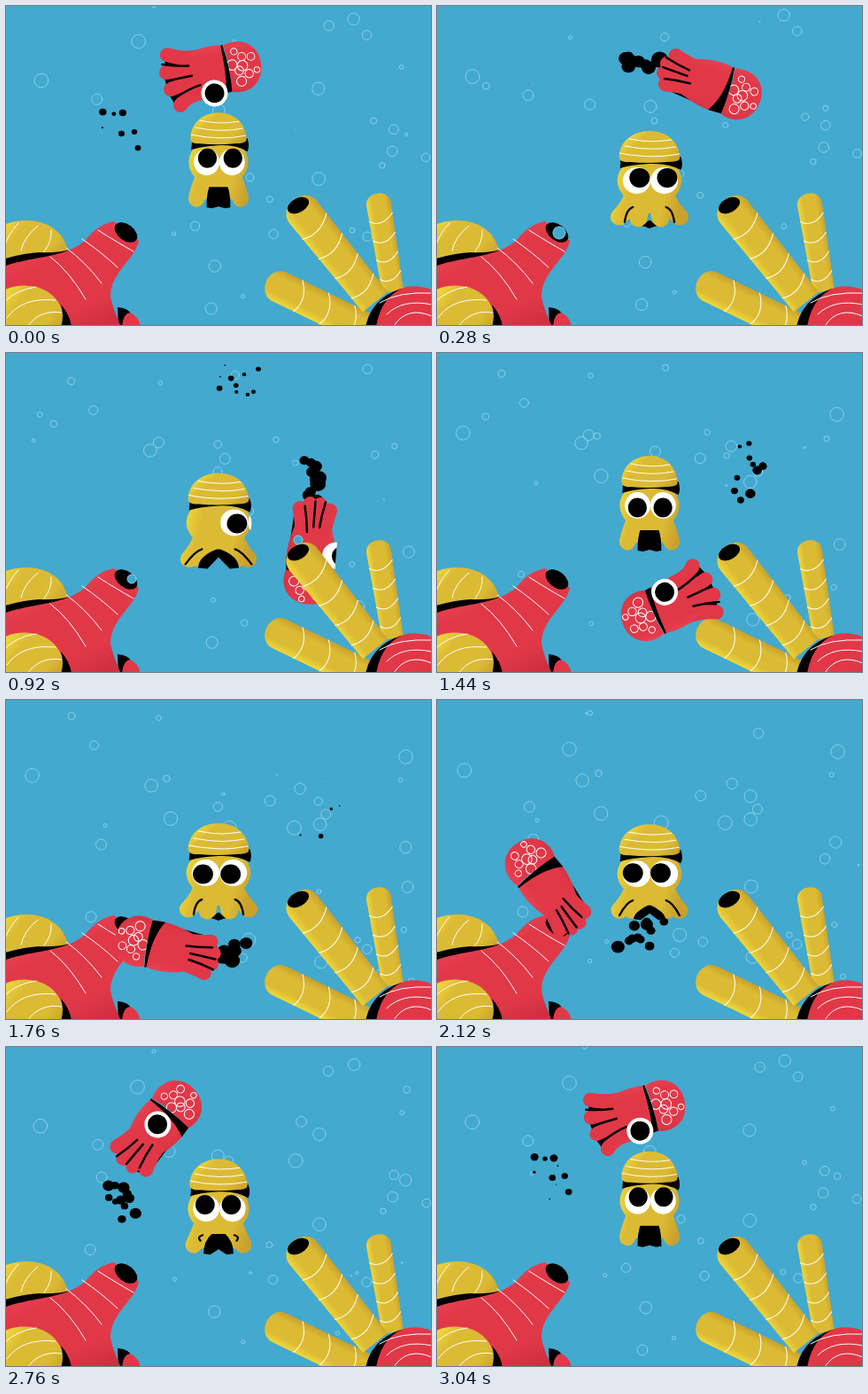
These frames come from a looping animation (480 px wide and 360 px high, 3.08 s). An HTML page with a canvas:

```html
<!DOCTYPE html>
<html>
<head>
<meta charset="utf-8">
<style>
html, body { margin: 0; width: 100%; height: 100%; overflow: hidden; background: #43a9cf }
canvas { display: block }
</style>
</head>
<body>
<canvas id="stage" width="480" height="360"></canvas>
<script>
const ctx = document.getElementById('stage').getContext('2d');
const LOOP = 3080, HALF = LOOP / 2, STEP = 40, RAD = Math.PI / 180;
const SEA = '#43a9cf', INK = '#000', WHITE = '#fff', RIM = '#8bd0ec', RED = '#e13848', YELLOW = '#dcbb34';

const clamp = v => Math.min(1, Math.max(0, v));
const smooth = v => { v = clamp(v); return v * v * (3 - 2 * v); };
const mix = (a, b, k) => a + (b - a) * k;
// Rises from a to b, holds, falls from c to d
const pulse = (t, a, b, c, d) => smooth((t - a) / (b - a)) * (1 - smooth((t - c) / (d - c)));
const noise = n => { const s = Math.sin(n * 127.1 + 3) * 43758.5; return s - Math.floor(s); };

function shade(x0, y0, x1, y1, light, base, dark) {
  const g = ctx.createLinearGradient(x0, y0, x1, y1);
  g.addColorStop(0, light);
  g.addColorStop(.25, base);
  g.addColorStop(.75, base);
  g.addColorStop(1, dark);
  return g;
}
const yellow = (...box) => shade(...box, '#f0d83a', YELLOW, '#c9a12d');
const red = (...box) => shade(...box, '#ea4555', RED, '#cf2f41');

function fill(d, color) {
  ctx.fillStyle = color;
  ctx.fill(new Path2D(d));
}
function line(d, color = WHITE, width = 1) {
  ctx.strokeStyle = color;
  ctx.lineWidth = width;
  ctx.lineCap = ctx.lineJoin = 'round';
  ctx.stroke(new Path2D(d));
}
function oval(x, y, rx, ry, color, turn = 0) {
  ctx.beginPath();
  ctx.ellipse(x, y, rx, ry, turn, 0, 7);
  ctx.fillStyle = color;
  ctx.fill();
}
function ring(x, y, r, color) {
  ctx.beginPath();
  ctx.arc(x, y, r, 0, 7);
  ctx.strokeStyle = color;
  ctx.lineWidth = 1;
  ctx.stroke();
}

// Each bubble swells, drifts up and shrinks around its own moment of the loop
function bubble(x, y, r, dt, life) {
  const size = r * clamp((life - Math.abs(dt)) / 140);
  if (size) ring(x + Math.sin(dt / 260 + x), y - dt * .016, size, RIM);
}
const since = (t, at) => ((t - at + LOOP * 1.5) % LOOP) - HALF;

function bubbles(t) {
  for (let i = 0; i < 70; i++)
    bubble(480 * noise(i), 360 * noise(i + 100), 2 + 6 * noise(i + 200), since(t, LOOP * noise(i + 300)), 800);
}
function tubeBubble(t, at, x, y, r) {
  const dt = since(t, at), size = r * clamp((260 - Math.abs(dt)) / 120);
  oval(x, y - dt * .02, size, size, SEA);
  if (size) ring(x, y - dt * .02, size, RIM);
}

function leftReef() {
  fill('M-5 248C15 239 40 240 55 252Q66 260 70 276L40 284-5 300Z', yellow(0, 242, 60, 290));
  line('M17 276Q20 261 36 248M43 277Q52 266 51 253M-2 272Q2 258 14 245');
  fill('M-5 286Q20 279 38 278 56 279 72 275L66 292-5 302Z', INK);
  fill('M126 340Q140 341 142 350L136 362H127Z', INK);
  fill('M131 362Q132 347 140 346 150 350 152 362Z', RED);
  fill('M-5 295C30 281 65 286 90 264Q104 246 122 243L150 265C146 286 118 300 118 328Q120 340 130 362H-5Z',
    red(40, 260, 90, 370));
  for (let i = 0; i < 4; i++)
    line(`M${50 + i * 18} ${283 - i * 10}Q${72 + i * 18} ${300 - i * 11} ${90 + i * 18} ${331 - i * 18}`);
  oval(135.5, 255.5, 14.5, 9, INK, .65);
  fill('M-5 322Q10 314 28 316 56 320 64 345V362H-5Z', yellow(5, 315, 65, 360));
  line('M1 352Q18 328 56 332M24 362Q38 342 63 346M-2 334Q12 320 34 317');
  fill('M62 337Q72 348 74 362H62Q66 350 62 337Z', INK);
}

// Tapered tube with evenly spaced stripes, from its tip to its foot
function tube(x0, y0, r0, x1, y1, r1, stripes) {
  const len = Math.hypot(x1 - x0, y1 - y0);
  ctx.save();
  ctx.translate(x0, y0);
  ctx.rotate(Math.atan2(y1 - y0, x1 - x0));
  fill(`M0 ${-r0}L${len} ${-r1}V${r1}L0 ${r0}C${-r0 * 1.2} ${r0} ${-r0 * 1.2} ${-r0} 0 ${-r0}Z`, yellow(0, r0, 0, -r0));
  for (let i = 0; i < stripes; i++) {
    const x = len * (i + .8) / (stripes + .5), r = mix(r0, r1, x / len);
    line(`M${x - 6} ${-r}Q${x + 9} 0 ${x} ${r}`);
  }
  ctx.restore();
}
function rightReef() {
  tube(421, 224, 14, 437, 322, 12, 4);
  tube(309, 317, 18, 412, 367, 18, 3);
  tube(336, 233, 20, 417, 334, 18, 4);
  oval(330, 225, 13, 8, INK, -.5);
  fill('M406 362Q410 342 425 330 438 320 452 318L430 362Z', INK);
  fill('M418 362Q424 326 452 317 468 314 485 322V362Z', red(425, 310, 470, 380));
  for (let i = 0; i < 3; i++)
    line(`M${438 - i * 8} ${361 - i * 13}Q${453 - i * 5} ${338 - i * 8} 481 ${350 - i * 13}`);
}

// The swimmer circles once per loop; its gait repeats every half turn
function orbit(t) {
  const k = t % HALF / HALF, turns = Math.floor(t / HALF) * 180;
  const sway = Math.sin(Math.PI * k ** .7);
  const angle = (180 * k - 76 + 8 * sway + turns) * RAD, dist = 116 + 20 * sway;
  return {
    k, angle,
    heading: (180 * k - 9 - 5 * sway + turns) * RAD,
    x: 238 + dist * Math.cos(angle),
    y: 180 + dist * Math.sin(angle)
  };
}
function swimmer({ k, x, y, heading }) {
  const fan = smooth((Math.abs(k - .45) - .28) / .17);
  const roll = k < .1 ? k + 1 : k, eyeY = 132 * (roll - .6) - 27, eyeR = 15 * clamp((1.1 - roll) / .07);
  const tips = [-1.5, -.5, .5, 1.5].map(s => [-92 + 3 * s * s + fan * (7 + 2 * s), s * (11.5 + 8 * fan) + 4 * fan]);
  const skin = red(0, -34, 0, 36);

  ctx.save();
  ctx.translate(x, y);
  ctx.rotate(heading);
  fill('M-50 -22L' + tips.map(([tx, ty]) => `${tx - 3} ${ty + 5}`).join('L') + 'L-50 25Z', INK);
  for (const [tx, ty] of tips) line(`M-48 ${ty * .7}Q-66 ${ty * .7} ${tx} ${ty}`, RED, 16);
  fill('M-17 -26C-32 -29 -48 -27 -66 -20Q-72 0 -66 21C-50 26 -34 30 -17 27Z', skin);
  tips.slice(1).forEach(([tx, ty], i) => {
    const my = (ty + tips[i][1]) / 2;
    line(`M${tx + 26} ${my * .6}Q${tx + 12} ${my * .7} ${tx - 3} ${my}`, INK, 2.5);
  });
  fill('M-17 -26C4 -34 24 -20 22 2C21 22 4 34 -16 27Q-12 0 -17 -26Z', skin);
  for (let i = 0; i < 9; i++) {
    const a = i * 2.4, d = 7.3 * Math.sqrt(i);
    ring(1 + d * Math.cos(a) * .8, d * Math.sin(a), 3 + 3 * noise(i + 5), WHITE);
  }
  fill(`M-18 -27Q-13 0 -15 27L${mix(-30, -22, fan)} 28Q-18 8 -20 -26Z`, INK);
  ctx.beginPath();
  ctx.rect(-70, -28, 70, 80);
  ctx.clip();
  oval(-35, eyeY, eyeR, eyeR, WHITE);
  oval(-35, eyeY + Math.min(0, eyeY) * .25, eyeR * .73, eyeR * .73, INK);
  ctx.restore();
}

// Two bursts per half turn: each blob leaves the tail, then drifts and fades
function ink(t) {
  for (let i = 0; i < 44; i++) {
    const burst = Math.floor(i / 11);
    const born = (burst >> 1) * HALF + (burst % 2 ? 715 : 70) + i % 11 * 20;
    const age = (t - born + LOOP) % LOOP, span = 650 + 400 * noise(i + 40);
    if (age > span) continue;
    const s = age / 1000, spread = 14 + 40 * s, { x, y, heading } = orbit(born);
    const dx = Math.cos(heading), dy = Math.sin(heading);
    const r = (6 + 4 * noise(i + 60)) * clamp(age / 60 + .4) * (1 - age / span) ** .6;
    oval(
      x + dx * (40 * s - 92) + (noise(i + 80) - .5) * spread,
      y + dy * (40 * s - 92) - 62 * s + (noise(i + 90) - .5) * spread,
      r, r * .92, INK);
  }
}

function hero(t, look) {
  const k = t % HALF / HALF, beat = (k + .065) % 1;
  const top = 116 + 25 * smooth(beat / .25) * (1 - Math.max(0, (beat - .25) / .75) ** 2.5);
  const open = pulse(beat, .065, .2, .74, .94), split = smooth((k - .2) / .3);
  const turn = 31 * pulse(t, 300, 800, 1000, 1350);
  const pose = (shut, loose, wide) => mix(shut, mix(loose, wide, split), open);
  const tipX = pose(26, 33, 32), innerX = pose(20, 12, 23), innerY = pose(90, 99, 96);
  const gap = pose(14, 9, 22), gapTop = pose(11, 1, 2), gapY = pose(84, 101, 86), gapMid = pose(106, 110, 95);

  ctx.save();
  ctx.translate(240, top);
  ctx.scale(mix(.96, 1.04, open), 1);
  const skin = yellow(-38, 50, 38, 70);
  for (const s of [-1, 1]) {
    line(`M${s * 19} 76Q${s * 24} 88 ${s * tipX} 97`, skin, 19);
    line(`M${s * 8} 76L${s * innerX} ${innerY}`, skin, 19);
  }
  oval(0, 76, 28, 17, skin);
  oval(0, 56, 35, 28, skin);
  if (open > .1)
    for (const s of [-1, 1])
      line(`M${s * 18} 86Q${s * 25} 88 ${s * mix(18, pose(18, 27, 36), open)} ${mix(86, 103, open)}`, INK, 2.2);
  fill(`M${-gap} 107Q${-gap} ${gapY + 8} ${-gapTop} ${gapY}H${gapTop}Q${gap} ${gapY + 8} ${gap} 107L${gap * .55} 108L0 ${gapMid}L${-gap * .55} 108Z`, INK);

  ctx.save();
  ctx.beginPath();
  ctx.ellipse(0, 57, 36, 29, 0, 0, 7);
  ctx.clip();
  for (const x of [-14, 16]) {
    oval(x + turn, 56, 15, 15, WHITE);
    oval(x + turn + 4 * Math.cos(look), 55 + 3.5 * Math.sin(look), 11, 11, INK);
  }
  ctx.restore();

  fill('M-31 31Q0 35 34 29Q37 38 34 44Q20 36 0 37 -20 38 -32 42Z', INK);
  fill('M-33 30C-33 12 -18 0 0 0C20 0 33 14 33 31Q32 35 20 35Q-2 37 -22 35 -32 36 -33 30Z', yellow(-20, 0, 20, 42));
  for (let i = 0; i < 3; i++)
    line(`M${-22 - i * 5} ${9 + i * 8}Q2 ${14 + i * 9} ${24 + i * 4} ${10 + i * 8}`);
  ctx.restore();
}

function draw(t) {
  const rival = orbit(t), inFront = t >= 1400 && t < 2000;
  ctx.fillStyle = SEA;
  ctx.fillRect(0, 0, 480, 360);
  bubbles(t);
  leftReef();
  if (inFront) rightReef();
  ink(t);
  swimmer(rival);
  if (!inFront) rightReef();
  tubeBubble(t, 280, 138, 256, 7);
  tubeBubble(t, 920, 142, 255, 5);
  tubeBubble(t, 920, 330, 211, 5);
  tubeBubble(t, 2480, 331, 222, 9);
  hero(t, rival.angle);
}
const start = performance.now();
function frame() {
  draw(Math.floor((performance.now() - start) % LOOP / STEP) * STEP);
  requestAnimationFrame(frame);
}
frame();
</script>
</body>
</html>
```
